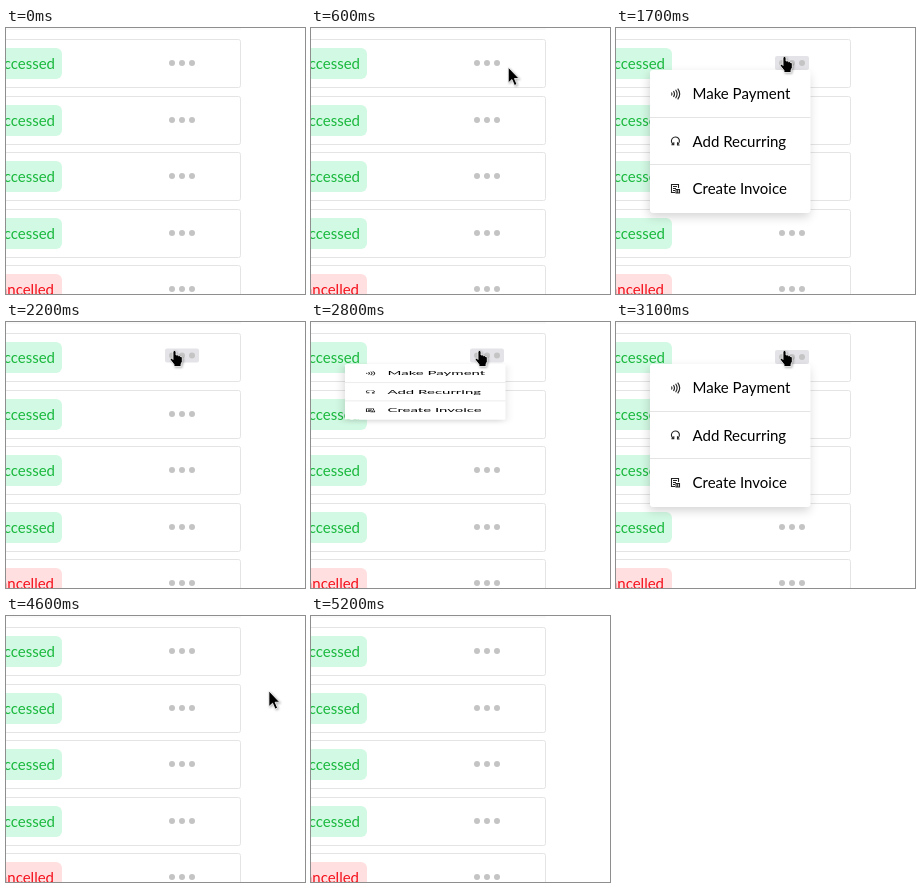
Recreate the animation shown at these times as an HTML page. Size 299 px wide and 266 px high, loop 5800 ms.

```html
<!DOCTYPE html>
<html lang="en">
<head>
<meta charset="utf-8">
<style>
  html, body { margin: 0; width: 100%; height: 100%; overflow: hidden; background: #fff; }
  svg { display: block; }
  text { font: 15px Lato, sans-serif; }
  #menu { filter: drop-shadow(-1px 4px 5px rgba(0, 0, 0, .16)); }
  .icon { fill: none; stroke: #222; stroke-width: 1.1; }
  #arrow, #hand { filter: drop-shadow(1px 1px 1px rgba(0, 0, 0, .3)); }
</style>
</head>
<body>
<svg width="299" height="266" viewBox="0 0 299 266">
  <rect width="235" height="2" fill="#fafafa"/>
  <g id="rows"></g>

  <g id="menu">
    <rect x="34" y="42" width="160.5" height="143" rx="3" fill="#fff"/>
    <path d="M34 89.5H194.5M34 136.5H194.5" stroke="#e4e4e4"/>
    <g class="icon">
      <path d="M55.5 64.5q1 1.5 0 3M57.5 63q2 3 0 6M59.6 61.8q3 4.200 0 8.400M61.700 60.700q4 5.300 0 10.600"/>
      <path d="M57.300 116.400A4 4 0 1 1 61.800 116.200M57.800 114.300V116.700H55.400M61.500 114.300V117H63.500"/>
      <path d="M62.500 160V156.500H55.500V164.500H59M57 158.500H61M57 160.500H60M57 162.500H59M60 161.500H63.500V165H60ZM61.700 161V165"/>
    </g>
    <text x="76.500" y="71">Make Payment</text>
    <text x="76.500" y="119">Add Recurring</text>
    <text x="76.500" y="166">Create Invoice</text>
  </g>

  <path id="arrow" d="M.5 .5V16.200L4.200 12.800 6.700 18.700 9.200 17.600 6.700 11.800H11.300Z" stroke="#fff" stroke-width=".8"/>
  <path id="hand" transform="translate(162 26)" stroke="#fff" stroke-width=".8"
    d="M5 3.500Q6.500 1.500 8 3.500V7Q9.500 6.300 10.300 7.700 11.700 7 12.300 8.500 14.300 8 14.300 10V13.500L13 16.200V18.500H6V16.500L2.300 11.800Q2 9.500 4 10.300L5 11.500Z"/>
</svg>
<script>
const LOOP = 5800, STEP = 100;
const $ = id => document.getElementById(id);
const clamp = u => Math.min(1, Math.max(0, u));
const ease = u => (1 - Math.cos(Math.PI * clamp(u))) / 2;
const mix = (a, b, u) => a + (b - a) * u;

const dots = [166, 176, 186].map(x => `<circle cx="${x}" cy="35" r="3"/>`).join('');
const row = (_, i) => {
  const [label, color, tint, end] = i < 4
    ? ['Successed', '#18b83c', '#d2f9e3', 49]
    : ['Cancelled', '#f5101c', '#ffdfdf', 48];
  return `<g transform="translate(0 ${Math.round(56.5 * i)})">
    <rect x="-10" y="11.5" width="244.500" height="48" rx="2" fill="#fff" stroke="#e4e4e4"/>
    <rect x="-30" y="20" width="86" height="31" rx="6" fill="${tint}"/>
    <text x="${end}" y="41" text-anchor="end" fill="${color}">${label}</text>
    <g class="more"><rect x="159" y="28" width="34" height="14" rx="2" fill="#e4e4e8" visibility="hidden"/>
    <g fill="#c4c4c4">${dots}</g></g></g>`;
};
$('rows').innerHTML = Array.from({ length: 5 }, row).join('');
const more = document.querySelector('.more');
const hover = more.querySelector('rect');

// Cursor legs: start, duration, from, to
const legs = [
  [200, 600, [289, 77], [166, 26]],
  [3300, 400, [166, 26], [276, 80]],
  [4500, 650, [276, 80], [38.5, -17.5]],
];
const clicks = [1200, 2000, 2600];
const openings = [[1270, 2100], [2670, 4000]];

function cursorAt(t) {
  const [start, span, from, to] = legs.findLast(leg => t >= leg[0]) || legs[0];
  const u = ease((t - start) / span);
  return from.map((v, i) => mix(v, to[i], u));
}

// Grows past full height, then settles
function growth(age) {
  return age < 320 ? 1.1 * ease(age / 320) : mix(1.1, 1, ease((age - 320) / 80));
}

function show(el, on) {
  el.setAttribute('visibility', on ? 'visible' : 'hidden');
}

function draw(t) {
  const [x, y] = cursorAt(t);
  const pointing = t >= 1000 && t < 3400;
  const present = t >= 300 && t < 5200;
  show($('hand'), pointing);
  show($('arrow'), present && !pointing);
  $('arrow').setAttribute('transform', `translate(${x} ${y})`);

  show(hover, present && x >= 159 && x < 193 && y >= 25 && y < 42);
  const lift = clicks.reduce((sum, c) => sum + Math.sin(Math.PI * clamp((t - c + 100) / 400)), 0);
  more.setAttribute('transform', `translate(0 ${-2 * lift})`);

  const open = openings.find(([from, to]) => t >= from + 50 && t < to);
  show($('menu'), open);
  if (open) {
    const scale = growth(t - open[0]);
    $('menu').setAttribute('transform', `translate(0 ${42 * (1 - scale)}) scale(1 ${scale})`);
  }
}

function tick() {
  draw(Math.floor(performance.now() % LOOP / STEP) * STEP);
  requestAnimationFrame(tick);
}
tick();
</script>
</body>
</html>
```
